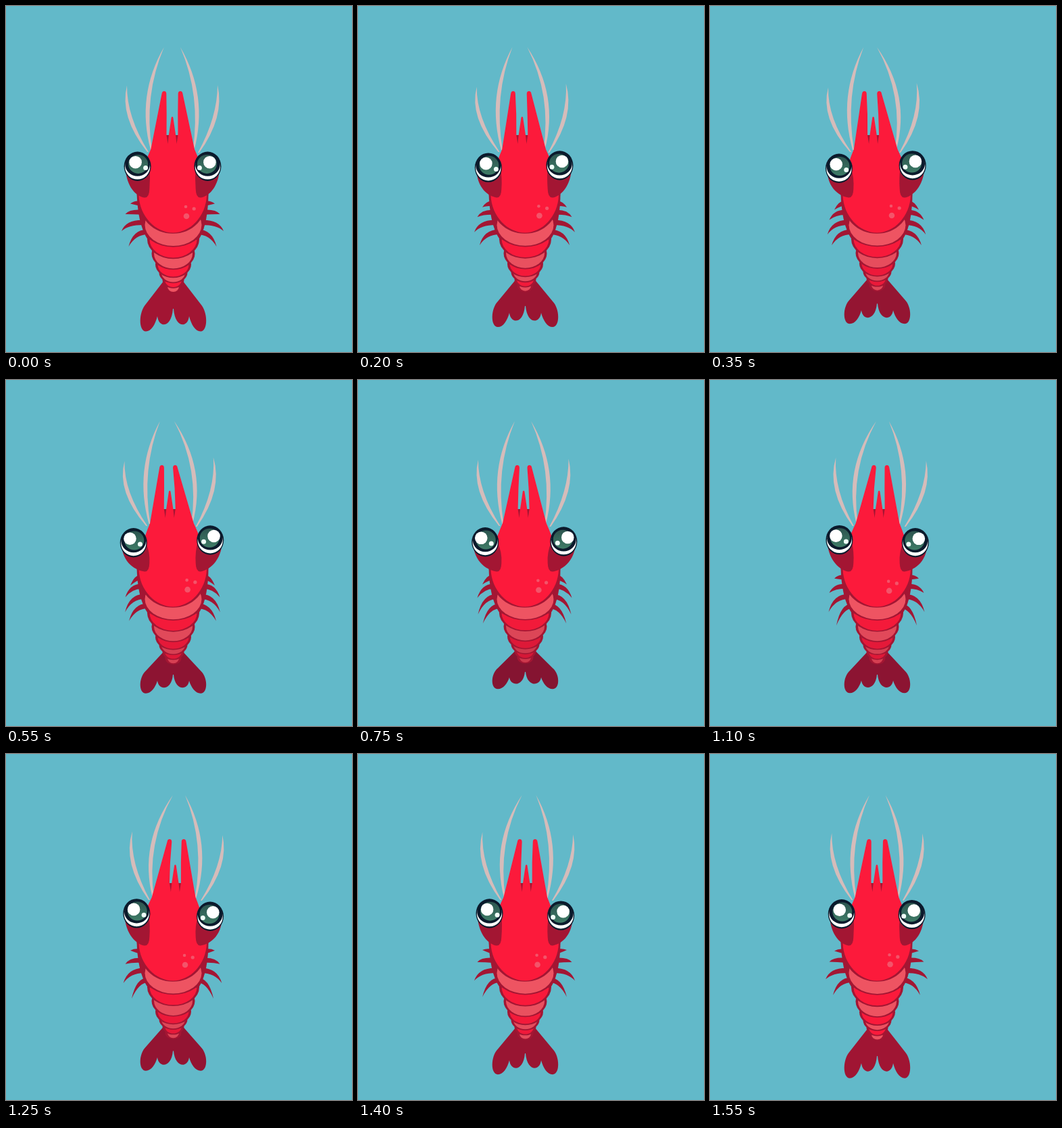
An HTML page with a canvas that plays this animation: 512x512 px, repeating every 1600 ms.

```html
<!DOCTYPE html>
<html lang="en">
<head>
<meta charset="utf-8">
<title>Swimming shrimp</title>
<style>
html, body { margin: 0; width: 100%; height: 100%; overflow: hidden; background: #62b9c9; }
canvas { display: block; }
</style>
</head>
<body>
<canvas id="stage" width="512" height="512"></canvas>
<script>
const ctx = document.getElementById('stage').getContext('2d');
const LOOP = 1600, STEP = 50;
const SEA = '#62b9c9', RED = '#fc1a3b', CRIMSON = '#a31633', FEELER = '#d5bcba', INK = '#0b1a2c';
const RED_RGB = [252, 26, 59], PINK_RGB = [238, 84, 98], CRIMSON_RGB = [163, 22, 51];

let C, S, C2; // cosine, sine and second harmonic of the loop phase
const wave = (mid, a = 0, b = 0, d = 0) => mid + a * C + b * S + d * C2;
const mix = (from, to, p) => `rgb(${from.map((v, i) => v + (to[i] - v) * p)})`;

function shape(color, path) {
  ctx.fillStyle = color;
  ctx.fill(new Path2D(path));
}

function oval(color, x, y, rx, ry = rx) {
  ctx.fillStyle = color;
  ctx.beginPath();
  ctx.ellipse(x, y, rx, ry, 0, 0, 2 * Math.PI);
  ctx.fill();
}

// Draws the left side, then its mirror image; draw receives 1 or -1.
function bothSides(axis, draw) {
  draw(1);
  ctx.save();
  ctx.translate(2 * axis, 0);
  ctx.scale(-1, 1);
  draw(-1);
  ctx.restore();
}

function squashed(pivot, k, draw) {
  ctx.save();
  ctx.translate(0, pivot * (1 - k));
  ctx.scale(1, k);
  draw();
  ctx.restore();
}

function feeler(tipX, tipY, bend, baseX, baseY) {
  const y = tipY + (baseY - tipY) * 0.47;
  shape(FEELER, `M${tipX} ${tipY} Q${bend - 5.5} ${y} ${baseX - 1} ${baseY}
    H${baseX + 1} Q${bend + 5.5} ${y} ${tipX} ${tipY}Z`);
}

function feelers() {
  feeler(wave(180, 0, -6, -1), wave(117.5, 0, 3), wave(173, 0, -5), wave(210, 0, -2), 216);
  feeler(wave(235.5, 0, -10, -1.7), 61, wave(198, 0, -4), wave(215, 0, -3), 213);
  feeler(wave(257, 0, -9.2, 1), 61, wave(295, 0, -4, -1), wave(277.5, 0, -3), 213);
  feeler(wave(313, 0, -7.4), wave(117, 0, -3), wave(319.5, 0, -5, -1), wave(285, 0, -4), 217);
}

function tail(p) {
  const color = mix([162, 21, 51], [132, 20, 49], p);
  squashed(378, 1 - 0.24 * p, () => bothSides(247.5, () => shape(color,
    'M234 406 L207 441 C196 453 196 481.5 207 481.5 C215 481.5 221 471 224 459 C226 477 245 477 247 448 L248 448 V406Z')));
}

function leg(x, y, tipX, tipY) {
  shape(CRIMSON, `M${x} ${y} Q${tipX + 7} ${y - 2} ${tipX} ${tipY}
    Q${tipX + 11} ${y + 6} ${x} ${y + 7}Z`);
}

function legs() {
  bothSides(246.5, () => {
    leg(200, 289, 184, wave(297, -4.5, 5.5));
    leg(203, 302, 176.5, wave(315, -7, 3));
    leg(207, 317, wave(174.3, -3.3), wave(340, -7, -0.5));
    leg(212, 331, wave(183.4, -2, -3), wave(358.5, -2.5, -4));
  });
}

function abdomen(p) {
  // bottom edge, half width and half height, head to tail
  const rings = [[355, 42, 31], [372.5, 35, 27], [388.5, 28.5, 22], [400.5, 23, 18],
                 [408.5, 17.5, 14], [416, 12.5, 11], [423, 8.5, 8]];
  squashed(336, 1 - 0.06 * p, () => {
    for (let i = rings.length - 1; i >= 0; i--) {
      const [bottom, w, h] = rings[i];
      oval(CRIMSON, 247.5, bottom - h, w + 3.5, h + 1.8);
      if (i === 0) shape(CRIMSON, 'M193.5 272 Q194 322 210 346 L285 346 Q300 322 299.5 272Z');
      const shade = p * Math.min(0.12 * i, 0.45);
      oval(mix(i % 2 ? RED_RGB : PINK_RGB, CRIMSON_RGB, shade), 247.5, bottom - h, w, h);
    }
  });
}

function head() {
  const left = wave(235.5, -1.5, -6.9), right = wave(256.5, 1.5, -6.4);
  const spike = wave(246, 0, -4.5), sway = wave(0, 0, -1.5);
  const gapL = spike - 8.5, gapR = spike + 8.5;
  shape(CRIMSON, 'M193.5 272 C193.5 318 220 336.8 247 336.8 S299.5 318 299.5 272Z');
  shape(CRIMSON, `M${gapL - 2} 191 H${gapR + 2} V210 H${gapL - 2}Z`);
  shape(RED, `M${left - 3.5} 130 Q${left - 3} 126 ${left} 126 Q${left + 3.3} 126 ${left + 3.3} 130
    Q${gapL + 0.5} 160 ${gapL} 191 L${gapL + 2} 204 L${spike - 5} 190 L${spike - 1.3} 165
    Q${spike} 162.5 ${spike + 1.3} 165 L${spike + 5} 190 L${gapR - 2} 204 L${gapR} 191
    Q${gapR - 0.5} 160 ${right - 3.3} 130
    Q${right - 3.3} 126 ${right} 126 Q${right + 3} 126 ${right + 3.5} 130
    L${279 + sway} 212 Q296 250 297 280 C296 312 272 335.5 247 335.5
    S197.5 312 196.5 280 Q197 250 ${214.3 + sway} 212Z`);
  const x = wave(267, 0, 2), y = wave(311, 0, -1);
  for (const [dx, dy, r] of [[0, 0, 4.3], [11.2, -11, 2.6], [-1, -14, 2.3]]) {
    oval('#f3546a', x + dx, y + dy, r);
  }
}

function eye(side) {
  const x = wave(191.5, 3.1, -1.2 * side), y = wave(238.3, -1.1, 2.25 * side);
  shape(CRIMSON, `M${x - 18} ${y} C${x - 17} ${y + 32} 194 282 205 283.5
    Q212 284 212.3 271 Q213.5 255 ${x + 18} ${y}Z`);
  oval(INK, x, y, 20, 21.7);
  oval('#fff', x, y + 0.8, 18.6, 18.6);
  oval(INK, x, y - 2.5, 18.3, 17);
  const iris = ctx.createLinearGradient(x, y - 18, x, y + 11);
  iris.addColorStop(0, '#2c544f');
  iris.addColorStop(1, '#3f7c67');
  oval(iris, x + 1, y - 3.3, 14.5, 14);
  const glint = x + wave(-4.5, 1.5);
  oval('#fff', glint, y - 6, 9.3);
  oval('#effff8', glint + 15, y + 2.3, 3.5);
}

function draw(t) {
  const phase = 2 * Math.PI * t / LOOP;
  C = Math.cos(phase);
  S = Math.sin(phase);
  C2 = Math.cos(2 * phase);
  const curl = Math.min(t / 770, (LOOP - t) / 680, 1.03);
  ctx.fillStyle = SEA;
  ctx.fillRect(0, 0, 512, 512);
  feelers();
  tail(curl);
  legs();
  abdomen(curl);
  head();
  bothSides(246.5, eye);
}

function tick() {
  draw(Math.floor(performance.now() % LOOP / STEP) * STEP);
  requestAnimationFrame(tick);
}
tick();
</script>
</body>
</html>
```
